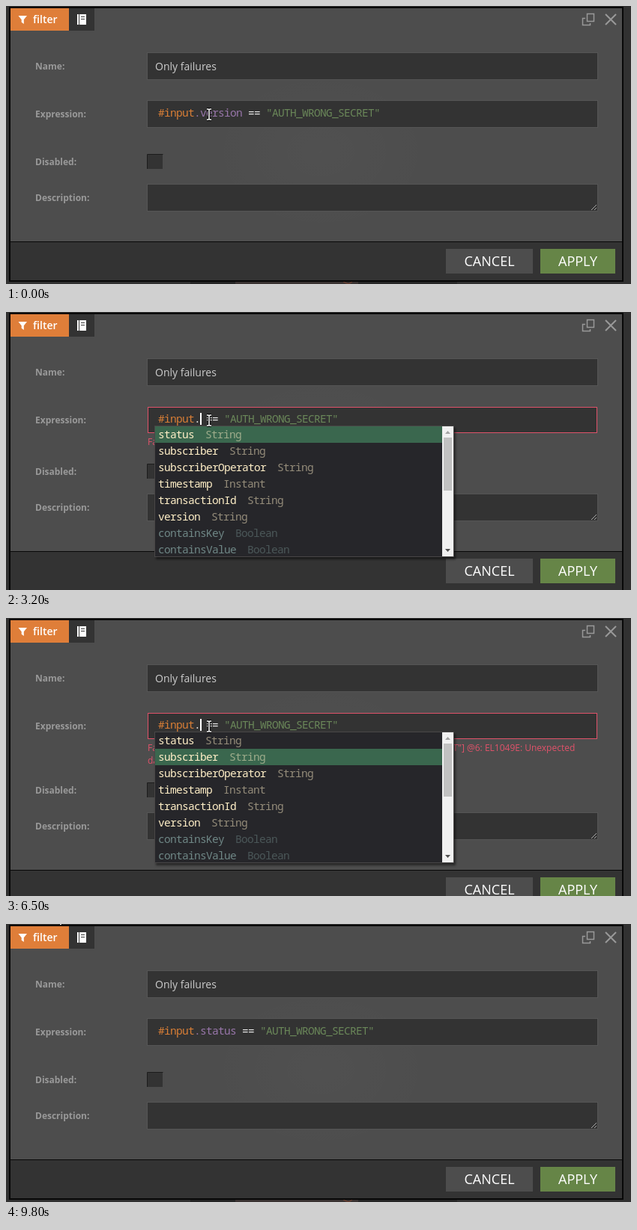
Write an HTML page that moves like this. It is 834 px wide and 372 px high and loops after 10 s.

```html
<!DOCTYPE html>
<html lang="en">
<head>
<meta charset="utf-8">
<title>Filter expression editor</title>
<style>
html, body { margin: 0; width: 100%; height: 100%; overflow: hidden; background: #313131; }
svg { display: block; width: 834px; height: 372px; }
text { white-space: pre; font-family: "Open Sans", sans-serif; font-size: 14px; }
.label { font-size: 12px; font-weight: 700; fill: #999; }
.error { font-size: 12px; fill: #e0526a; }
.button { font-size: 18px; fill: #fff; text-anchor: middle; }
.code { font-family: "Noto Sans Mono", monospace; font-size: 14.5px; letter-spacing: -.7px; }
.field { fill: #333; stroke: #555; }
.line { fill: none; stroke: #999; }
</style>
</head>
<body>
<svg id="stage" viewBox="0 0 834 372">
  <defs>
    <filter id="shadow" x="-10%" y="-30%" width="120%" height="170%">
      <feDropShadow dx="2" dy="3" stdDeviation="1.6" flood-color="#000" flood-opacity=".5"/>
    </filter>
    <clipPath id="popupClip"><rect x="199" y="153" width="398" height="174"/></clipPath>
    <radialGradient id="glow">
      <stop offset="0" stop-color="#fff" stop-opacity=".02"/>
      <stop offset="1" stop-color="#fff" stop-opacity="0"/>
    </radialGradient>
  </defs>
  <g id="scene"></g>
</svg>
<script>
const LOOP = 10000, TICK = 100, CELL = 8, CODE_X = 203, ROW = 22;
const ORANGE = '#d87e36', PURPLE = '#9876aa', GREEN = '#6a8759', PALE = '#f1f1f1';
const CREAM = '#ffefc7', TEAL = '#6f8786';

const PREFIX = 'Failed to parse expression: ';
const FIELDS = 'subscriberOperator: String, version: String, timestamp: Instant, transactionId: String}';
const ERRORS = {
  none: [],
  types: [PREFIX + "Operator '==' used with not comparable types: {status: String, subscriber: String,",
    FIELDS + ' and String'],
  reference: [PREFIX + 'Unresolved reference inp'],
  syntax: [PREFIX + 'Expression [#input. == "AUTH_WRONG_SECRET"] @6: EL1049E: Unexpected',
    "data after '.': 'eq(==)'"],
  property: [PREFIX + "There is no property 's' in type: {status: String, subscriber: String,", FIELDS]
};
const SHIFT = [0, 5, 22];

const INPUT_ROW = [['#input', '{status: String, subscriber: String, subscriberOperator: String', CREAM]];
const MEMBERS = [
  ['status', 'String', CREAM], ['subscriber', 'String', CREAM],
  ['subscriberOperator', 'String', CREAM], ['timestamp', 'Instant', CREAM],
  ['transactionId', 'String', CREAM], ['version', 'String', CREAM],
  ['containsKey', 'Boolean', TEAL], ['containsValue', 'Boolean', TEAL]
];

// Each track lists [start time, value]; a value holds until the next start.
const TRACKS = {
  code: [[0, '#input.version'], [1000, '#input.'], [1100, '#input'], [1800, '#inpu'], [1900, '#inp'],
    [2900, '#input'], [3200, '#input.'], [7600, '#input.s'], [7900, '#input.status']],
  error: [[0, 'none'], [1700, 'types'], [2700, 'reference'], [3900, 'syntax'],
    [8700, 'property'], [9300, 'none']],
  popup: [[0, ''], [2100, 'input'], [2900, ''], [3200, 'members'], [7900, '']],
  selected: [[0, 0], [4100, 1], [5600, 2], [6500, 1], [6800, 0]],
  focus: [[0, false], [400, true], [9600, false]],
  marked: [[0, false], [500, true], [1000, false]],
  caret: [[0, false], [400, true], [2400, false], [2900, true], [3900, false], [4300, true],
    [4900, false], [5300, true], [5900, false], [6300, true], [6900, false], [7300, true],
    [8500, false], [8600, true], [9400, false]]
};
const valueAt = (track, t) => track.filter(([start]) => start <= t).pop()[1];

const rect = (x, y, w, h, attrs) => `<rect x="${x}" y="${y}" width="${w}" height="${h}" ${attrs}/>`;
const fill = (x, y, w, h, color) => rect(x, y, w, h, `fill="${color}"`);
const path = (d, attrs) => `<path d="${d}" ${attrs}/>`;
const text = (x, y, content, attrs) => `<text x="${x}" y="${y}" ${attrs}>${content}</text>`;
const span = (color, content) => `<tspan fill="${color}">${content}</tspan>`;
const label = (y, content) => text(39, y, content, 'class="label"');
const field = (y, h) => rect(188.5, y + .5, 601, h - 1, 'class="field"');

function header() {
  return fill(6, 3, 78, 30, '#df7e39') + fill(84, 3, 34, 30, '#333') +
    path('M16.5 13H28L23.8 18.3V24L20.7 21.7V18.3Z', 'fill="#fff"') +
    text(36, 23, 'filter', 'font-weight="600" fill="#fff"') +
    fill(95, 11, 12, 14, '#fff') + path('M97.5 11V25M100 14.5H105M100 17.5H105', 'stroke="#333" fill="none"') +
    path('M775.5 10.5H784.5V20.5H775.5ZM773 16.5H769.5V25.5H779.5V23', 'class="line" stroke-width="1.5"') +
    path('M800 11L814 25M814 11L800 25', 'class="line" stroke-width="2"');
}

function backdrop(shift) {
  return fill(0, 0, 834, 372, '#313131') +
    fill(246, 369, 60, 3, '#242424') + fill(306, 369, 164, 3, '#3a3332') +
    fill(470, 369, 132, 3, '#272727') + path('M450 369L457 372L462 369', 'stroke="#7a4330" fill="none"') +
    fill(4, 1, 820, 368 + shift, '#080808') + fill(6, 3, 816, 364 + shift, '#4d4d4d') +
    '<ellipse cx="420" cy="195" rx="150" ry="110" fill="url(#glow)"/>';
}

function lowerForm() {
  return label(213, 'Disabled:') + fill(189, 198, 20, 20, '#333') +
    path('M188.5 218V198.5H209.5', 'fill="none" stroke="#1c1c1c"') +
    label(261, 'Description:') + field(238, 37) +
    path('M781 273L788 266M785 273L788 270', 'stroke="#aaa" fill="none"') +
    fill(6, 315, 816, 52, '#333') + fill(6, 315, 816, 1, '#080808') +
    fill(587, 325, 116, 33, '#4d4d4d') + text(645, 348, 'CANCEL', 'class="button"') +
    fill(713, 325, 100, 33, '#668547') + text(763, 348, 'APPLY', 'class="button"');
}

function editor(s, hasError) {
  const [root, member] = s.code.split('.');
  const dot = member === undefined ? '' : span(member ? PURPLE : PALE, '.');
  const tokens = span(ORANGE, root) + dot + span(PURPLE, member || '') +
    span(PALE, ' == ') + span(GREEN, '"AUTH_WRONG_SECRET"');
  const stroke = hasError ? '#e0526a' : '#6a6a6a';
  const box = hasError || s.focus
    ? rect(189.5, 127.5, 599, 34, `fill="#333" stroke="${stroke}"`)
    : field(126, 37);
  const end = CODE_X + s.code.length * CELL;
  return box + (s.marked ? fill(259, 134, 56, 18, '#555') : '') +
    text(CODE_X, 148, tokens, 'class="code"') +
    (s.caret ? fill(end, 135, 2, 16, '#fff') : '');
}

function highlight(name, query) {
  const i = query ? name.indexOf(query) : -1;
  if (i < 0) return name;
  return name.slice(0, i) + span('#93ca12', query) + name.slice(i + query.length);
}

function scrollbar(thumb) {
  return fill(582, 153, 15, 174, '#f1f1f1') + fill(584, 168, 11, thumb, '#c1c1c1') +
    path('M586 163L589.5 159L593 163Z', 'fill="#a3a3a3"') +
    path('M586 317L589.5 321L593 317Z', 'fill="#505050"');
}

function popup(s) {
  if (!s.popup) return '';
  const members = s.popup === 'members';
  const rows = members ? MEMBERS : INPUT_ROW;
  const query = members ? s.code.split('.')[1] : s.code;
  const height = members ? 174 : ROW;
  const items = rows.map(([name, meta, color], i) => {
    const y = 169 + i * ROW;
    return text(CODE_X, y, highlight(name, query), `class="code" fill="${color}"`) +
      text(CODE_X + name.length * CELL + 15, y, meta, `class="code" fill="${color}" opacity=".5"`);
  }).join('');
  return rect(198.5, 152.5, 399, height + 1, 'fill="#25282c" stroke="#484747" filter="url(#shadow)"') +
    `<g clip-path="url(#popupClip)">${fill(199, 153 + s.selected * ROW, 398, ROW, '#3a674e')}${items}` +
    (members ? scrollbar(query ? 100 : 71) : '') + '</g>';
}

function pointer(t) {
  const p = Math.min(1, Math.max(0, (t - 9300) / 500));
  const k = p * p * (3 - 2 * p);
  const x = 271 - 205 * k, y = 145 - 161 * k;
  const beam = 'M-3 -7H-1L0 -6L1 -7H3M0 -6V6M-3 7H-1L0 6L1 7H3';
  const shape = y > 126
    ? path(beam, 'fill="none" stroke="#000" stroke-width="3.4"') +
      path(beam, 'fill="none" stroke="#fff" stroke-width="1.5"')
    : path('M0 0V15L3.5 11.8L6 18L8.8 16.8L6.2 10.8H11Z', 'fill="#fff" stroke="#000"');
  return `<g transform="translate(${x} ${y})">${shape}</g>`;
}

function draw(t) {
  const s = {};
  for (const name in TRACKS) s[name] = valueAt(TRACKS[name], t);
  const lines = ERRORS[s.error], shift = SHIFT[lines.length];
  return backdrop(shift) + header() +
    label(85, 'Name:') + field(62, 37) + text(199, 86, 'Only failures', 'fill="#ccc"') +
    label(149, 'Expression:') + editor(s, lines.length > 0) +
    lines.map((line, i) => text(189, 178 + i * 17, line, 'class="error"')).join('') +
    `<g transform="translate(0 ${shift})">${lowerForm()}</g>` +
    popup(s) + pointer(t);
}

const scene = document.getElementById('scene');
const begin = performance.now();
let shown = -1;
function frame() {
  const tick = Math.floor(((performance.now() - begin) % LOOP) / TICK);
  if (tick !== shown) {
    shown = tick;
    scene.innerHTML = draw(tick * TICK);
  }
  requestAnimationFrame(frame);
}
frame();
</script>
</body>
</html>
```
